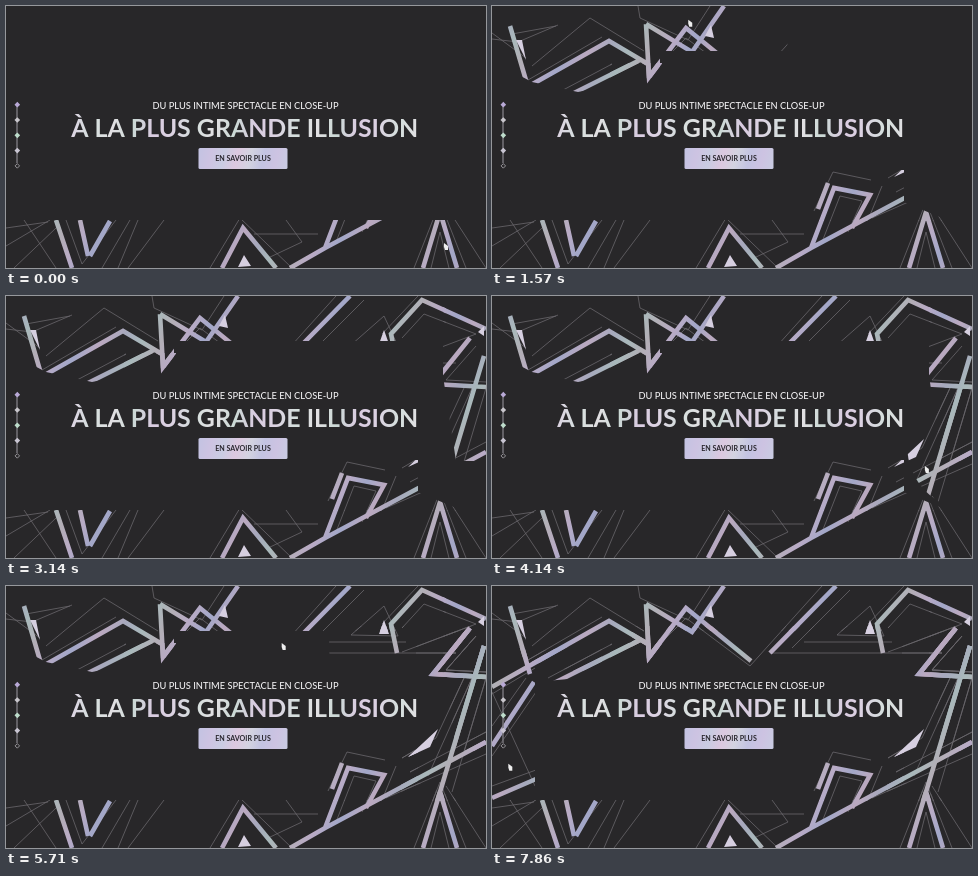
These frames come from a looping animation (480x262 px, 8000 ms). An HTML page with a canvas:

```html
<!DOCTYPE html>
<html lang="fr">
<head>
<meta charset="utf-8">
<style>
html, body { margin: 0; width: 100%; height: 100%; overflow: hidden; background: #282729; }
canvas { display: block; }
</style>
</head>
<body>
<canvas id="stage" width="480" height="262"></canvas>
<script>
const W = 480, H = 262, LOOP = 8000, STEP = 1000 / 7;
const BG = '#282729';
const ctx = document.getElementById('stage').getContext('2d');

const thick = [
  // top
  'M0 101L117 35L156 58M60 98L150 53M154 18L157 71L194 22L259 75M154 18L200 46L232 0',
  'M278 67L344 0M391 67L385 38L416 4L480 33',
  // right
  'M464 42L427 88L480 91M478 60L434 206M284 262L319 242L480 156',
  'M319 242L342 182L378 189L360 222M336 177L326 203',
  // bottom
  'M50 214L66 262M74 214L82 250M84 250L104 215M216 262L237 222L270 262M417 262L434 206L451 262',
  // left
  'M18 20L38 88M42 96L0 160M0 212L44 193'
].join('');

const thinTop = [
  'M0 27L34 52M0 33L26 36L66 19M20 28L64 20M40 60L98 12L152 45M36 74L110 31M56 92L120 58',
  'M146 0L148 12L196 34L218 0M162 64L194 32L258 80L330 0',
  'M278 67H450M300 62L358 4M312 56H400M345 49L378 20L392 50Z',
  'M396 42L418 18L470 38L396 66M376 38L412 0'
].join('');

const thinLow = [
  // right
  'M470 50L440 84L480 86M466 92L422 190M480 92L446 206M458 92L430 152L396 172M404 186L480 146',
  'M380 212L480 168M322 205L341 166L379 174M390 180L376 214M330 236L348 190L370 195L356 226',
  // bottom
  'M408 262L434 196L460 262M425 262L434 226L443 262M440 200L480 262M0 240L44 214M8 262L50 222',
  'M0 222L42 216M18 214L50 262M60 214L76 258L110 214M112 262L132 214M122 262L158 214',
  'M96 262L124 214M204 262L234 212L286 262M248 228H312M280 214L296 236L262 252',
  // left
  'M0 108L43 82M0 140L34 92M0 170L44 106M0 200L44 184M0 106L43 200'
].join('');

const shards = [
  'M213 30L219 19L222 32ZM373 48L378 34L383 48ZM402 171L432 143L424 161Z',
  'M232 261L238 249L245 260ZM472 36L478 30V40ZM24 34L30 34L34 54Z'
].join('');

// start, end, brush origin x and y, final brush radius, outline of the area uncovered
const areas = [
  [140, 860, 440, 215, 145, 'M305 164H412V196L450 212V215H305Z'],
  [570, 860, 170, 90, 65, 'M118 57H170V74L156 94H144V76H118Z'],
  [860, 2140, 110, 60, 336, 'M0 0H440V45H168V72H156L86 86L40 76L0 55Z'],
  [2290, 3140, 480, 0, 172, 'M437 0H480V165H450L437 80Z'],
  [3430, 4860, 480, 150, 130, 'M437 45H410V92H424L395 168V215H480V45Z'],
  [5000, 6570, 480, 60, 345, 'M480 40V93H400L345 70L262 82L140 76V40Z'],
  [6860, 7860, 110, 60, 192, 'M0 50L40 66L110 56V90L43 96V215H0Z']
].map(([start, end, x, y, reach, d]) => ({ start, end, x, y, reach, path: new Path2D(d) }));

// time, x, y of the pointer
const route = [
  [0, 440, 240], [430, 345, 188], [860, 149, 88], [1140, 30, 40], [2140, 420, -14],
  [3140, 490, 150], [4000, 440, 190], [4860, 409, 87], [5700, 280, 60],
  [6570, 138, 67], [6860, 138, 67], [7860, 18, 181], [8000, 18, 181]
];

function holo(c, x0, y0, x1, y1, count, hues) {
  const g = c.createLinearGradient(x0, y0, x1, y1);
  for (let i = 0; i <= count; i++) g.addColorStop(i / count, hues[i % hues.length]);
  return g;
}

function makeArt() {
  const art = document.createElement('canvas');
  art.width = W;
  art.height = H;
  const c = art.getContext('2d');
  c.strokeStyle = '#6a686d';
  c.lineWidth = 0.8;
  c.stroke(new Path2D(thinTop + thinLow));
  c.strokeStyle =
    holo(c, 0, 0, W, H, 31, ['#bba9c0', '#a6a9bd', '#a9b9bb', '#b3aeb6', '#b9abc6', '#a2a7c8']);
  c.lineWidth = 4.6;
  c.stroke(new Path2D(thick));
  c.fillStyle = '#d6cfe0';
  c.fill(new Path2D(shards));
  return art;
}

const art = makeArt();
const titleFill = holo(ctx, 66, 108, 412, 134, 17, ['#dcd3e2', '#d5dfdd', '#e2e0e3', '#cbd9d5', '#d9cbe0']);
const buttonFill = holo(ctx, 193, 142, 281, 164, 7, ['#c3c3e2', '#cdc3e2', '#c9cce2', '#dcc8e0', '#d3d3e0']);

function text(str, x, y, font, fill) {
  ctx.font = font + ' Lato, sans-serif';
  ctx.fillStyle = fill;
  ctx.fillText(str, x, y);
}

function reveal(t) {
  ctx.drawImage(art, 0, 214, W, 48, 0, 214, W, 48);
  for (const a of areas) {
    const p = Math.min(1, (t - a.start) / (a.end - a.start));
    if (p <= 0) continue;
    ctx.save();
    ctx.clip(a.path);
    if (p < 1) {
      ctx.beginPath();
      ctx.arc(a.x, a.y, p * a.reach, 0, 7);
      ctx.clip();
    }
    ctx.drawImage(art, 0, 0);
    ctx.restore();
  }
}

function dots() {
  ctx.strokeStyle = '#77757b';
  ctx.lineWidth = 1;
  ctx.strokeRect(11, 99, 0, 58);
  ['#b9a9d6', '#c9c7cc', '#bddccb', '#c9c5d2', BG].forEach((fill, i) => {
    ctx.save();
    ctx.translate(11.3, 98.7 + i * 15.3);
    ctx.rotate(Math.PI / 4);
    ctx.fillStyle = fill;
    ctx.fillRect(-2, -2, 4, 4);
    if (i === 4) {
      ctx.strokeStyle = '#aaa8ad';
      ctx.lineWidth = 0.8;
      ctx.strokeRect(-1.6, -1.6, 3.2, 3.2);
    }
    ctx.restore();
  });
}

function pointer(t) {
  const i = Math.max(1, route.findIndex(k => k[0] >= t));
  const [t0, x0, y0] = route[i - 1], [t1, x1, y1] = route[i];
  const p = (t - t0) / (t1 - t0);
  ctx.save();
  ctx.translate(x0 + (x1 - x0) * p, y0 + (y1 - y0) * p);
  ctx.fillStyle = '#eee';
  ctx.fill(new Path2D('M-2 -3L2 0V4H-1L-2 1Z'));
  ctx.restore();
}

function draw(now) {
  const t = Math.floor((now % LOOP + 5) / STEP) * STEP;
  ctx.fillStyle = BG;
  ctx.fillRect(0, 0, W, H);
  reveal(t);
  dots();
  ctx.textAlign = 'center';
  text('DU PLUS INTIME SPECTACLE EN CLOSE-UP', 239.5, 102.5, '500 9.3px', '#f0eff1');
  text('À LA PLUS GRANDE ILLUSION', 238.7, 130.5, '700 24.9px', titleFill);
  ctx.fillStyle = buttonFill;
  ctx.beginPath();
  ctx.roundRect(192.5, 142, 89, 21, 1.5);
  ctx.fill();
  text('EN SAVOIR PLUS', 237, 155.4, '700 7.1px', '#29272e');
  pointer(Math.min(t, LOOP));
}

const begin = performance.now();
function tick() {
  draw(performance.now() - begin);
  requestAnimationFrame(tick);
}
tick();
</script>
</body>
</html>
```
